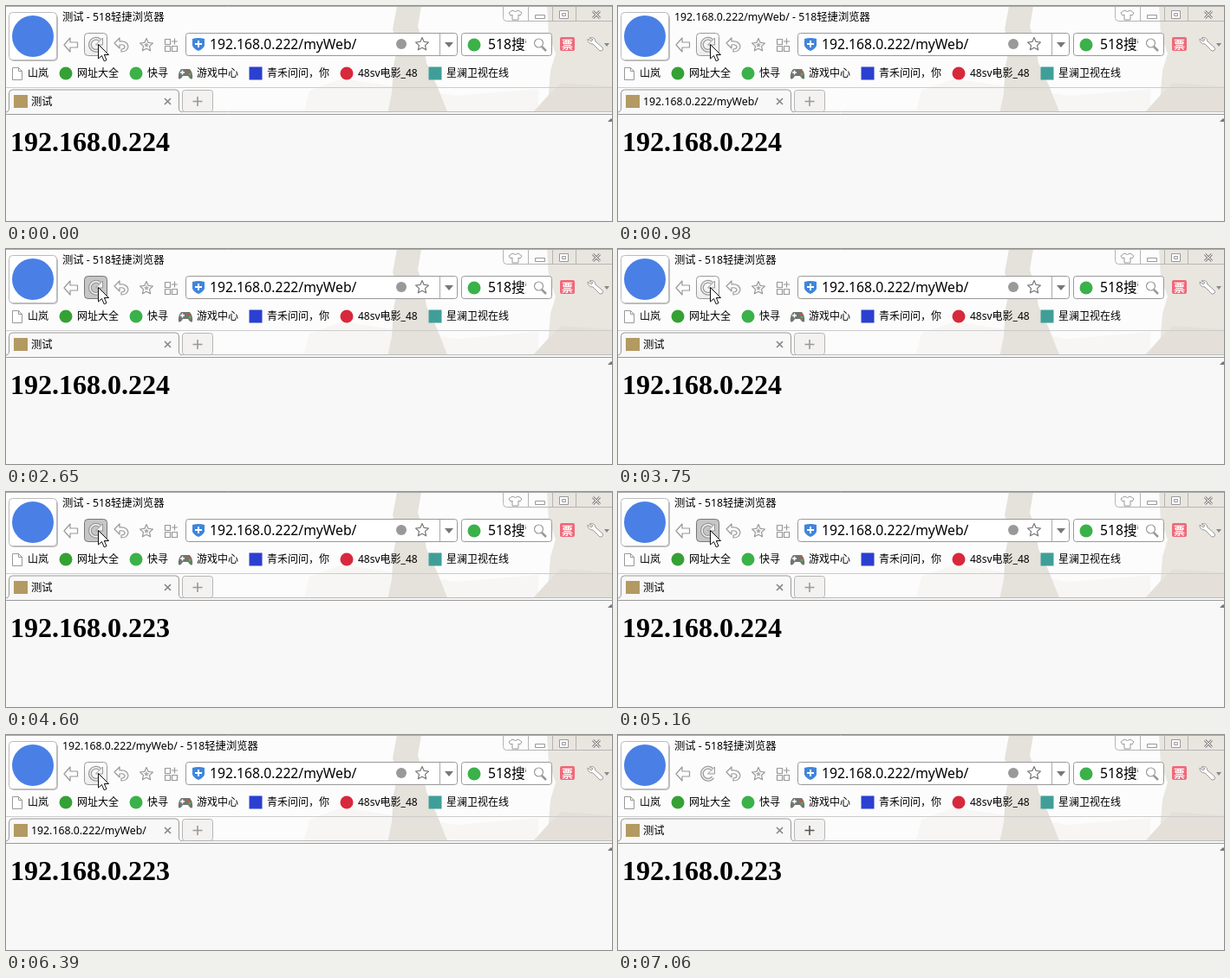
An HTML page that plays this animation: 699 by 249 pixels, repeating every 7310 ms.

```html
<!DOCTYPE html>
<html lang="zh">
<head>
<meta charset="utf-8">
<style>
html, body { margin: 0; width: 100%; height: 100%; overflow: hidden; background: #f8f8f8; }
svg { display: block; width: 699px; height: 249px; }
text { font: 12px "Noto Sans", "Noto Sans CJK SC", "Noto Sans CJK", sans-serif; fill: #000; }
.label { font-size: 12.3px; }
.field { font-size: 15.7px; }
.line { fill: none; stroke: #999; stroke-width: 1.2; stroke-linejoin: round; }
.box { fill: #fff; stroke: #999; }
#address { font: bold 32px "Liberation Serif", serif; }
</style>
</head>
<body>
<svg viewBox="0 0 699 249">
  <defs>
    <linearGradient id="shine" x2="0" y2="1"><stop stop-color="#fff"/><stop offset="1" stop-color="#ececec"/></linearGradient>
    <clipPath id="searchClip"><path d="M550 32h50v26h-50z"/></clipPath>
    <path id="star" d="M0-7.5 2.2-2.6 7.4-2 3.5 1.6 4.6 6.8 0 4.2-4.6 6.8-3.5 1.6-7.4-2-2.2-2.6z"/>
  </defs>

  <!-- window background -->
  <path fill="#fcfcfc" d="M0 0h699v125H0z"/>
  <path fill="#f7f6f4" d="M343 125 350 98 388 84 440 92 520 104 614 96V125z"/>
  <path fill="#e5e1db" d="M451 0h28l-4 24 6 18 4 24 12 26 13 33h-70l5-24 2-32 5-24-6-18z"/>
  <path fill="#e9e6e0" d="M624 0h75v125h-75l4-50 6-20-8-22z"/>
  <path fill="#e4e0d9" d="m606 125 20-22 14-14 59 4v32z"/>
  <path stroke="#aaa" d="M0 .5h699"/>
  <path stroke="#ccc" d="M0 94.500h699"/>

  <!-- window buttons -->
  <path d="M573.5 0v13.500q0 4 4 4H699M602.5 0v17M630.5 0v17M657.5 0v17" fill="none" stroke="#b5b5b5"/>
  <path class="box" d="M584 5q3.500 3 7 0l4 3-2 3-2-1v6h-7v-6l-2 1-2-3z"/>
  <path class="box" d="M610.500 10.500h11v4h-11zM638.500 5.500h10v9h-10zM641.500 8.500h4v3h-4z"/>
  <path d="m677 6 8 8m0-8-8 8" stroke="#888" stroke-width="3"/>
  <path d="m677 6 8 8m0-8-8 8" stroke="#fff"/>

  <!-- badge and title -->
  <rect x="4" y="9" width="56" height="55" rx="5" fill="#000" opacity=".25"/>
  <rect x="3.500" y="7.500" width="55" height="55" rx="4" fill="#fff" stroke="#bbb"/>
  <circle cx="31" cy="35" r="24" fill="#4a80e6"/>
  <text id="title" class="label" x="65" y="17"/>

  <!-- toolbar -->
  <path class="line" d="m74 37-7 8 7 8v-5h8.500v-6H74z"/>
  <rect id="reload" x="90.500" y="31.500" width="26" height="26" rx="4"/>
  <g fill="none" stroke-linejoin="round">
    <path d="M109.500 49a7 7 0 1 1-1-9.500" stroke="#999" stroke-width="4"/>
    <path d="M109.500 49a7 7 0 1 1-1-9.500" stroke="#f4f4f4" stroke-width="1.500"/>
    <path d="M111.500 37v8h-8z" fill="#f4f4f4" stroke="#999"/>
  </g>
  <path class="line" d="m125 43 6-6v4q9-1 10 6-1 6-8 6v-3q4 0 4-3-1-3-6-2v4z"/>
  <use href="#star" class="line" x="162" y="45"/>
  <use href="#star" fill="#aaa" transform="translate(162 45) scale(.4)"/>
  <path class="line" d="M183.500 38.500h6v6h-6zM183.500 46.500h6v6h-6zM191.500 46.500h6v6h-6zM194.500 37.500v7M191 41h7"/>
  <rect class="box" x="207.500" y="31.500" width="313" height="26" rx="3"/>
  <path fill="#3f86dc" d="M215 38q7-2 14 0v8q-2 4-7 6-5-2-7-6z"/>
  <path stroke="#fff" stroke-width="2" d="M222 40v8m-4-4h8"/>
  <text class="field" x="235" y="50">192.168.0.222/myWeb/</text>
  <circle cx="456" cy="44" r="6" fill="#999"/>
  <use href="#star" class="line" x="480" y="44" style="stroke:#777"/>
  <path d="M500.500 32v25" stroke="#aaa"/>
  <path d="M506 42h10l-5 6z" fill="#777"/>
  <rect class="box" x="525.500" y="31.500" width="104" height="26" rx="3"/>
  <circle cx="540" cy="45" r="7.500" fill="#3bb14a"/>
  <text class="field" x="556" y="50" clip-path="url(#searchClip)">518搜索</text>
  <g class="line"><circle cx="614.500" cy="43" r="5"/><path d="m618 47 5 5" stroke-width="2.500"/></g>
  <rect x="639" y="36" width="17" height="16" rx="2" fill="#ee6a7a"/>
  <text x="641" y="49" style="fill:#fff;font-weight:bold;font-size:13px">票</text>
  <path class="box" d="M673 37q6-2 7 4l8 7q2 4-3 4l-8-8q-6 0-6-6l4 3 2-2z"/>
  <path d="M690 43h6l-3 4z" fill="#888"/>

  <g id="bookmarks">
    <path class="box" d="M7.500 71.500h7l4 4v10h-11zM14.500 71.500v4h4"/>
    <path d="M202 73h10q4 5 3 11-2 2-5-3h-6q-3 5-5 3-1-6 3-11z" fill="#6f7770"/>
    <path d="M201 77h5m-2.500-2.500v5" stroke="#fff" stroke-width="1.500"/>
    <circle cx="210" cy="76" r="1.300" fill="#e04a3a"/><circle cx="212" cy="79" r="1.300" fill="#52b848"/>
  </g>

  <!-- tabs and page -->
  <path fill="#f8f8f8" d="M0 123h699v126H0z"/>
  <path d="M0 122.500h699" stroke="#bbb"/>
  <path d="M.5 123q3-1 3-4v-18q0-4 4-4h188q4 0 4 4v18q0 3 3 4" fill="#f8f8f8" stroke="#999"/>
  <path d="M0 125.500h699" stroke="#999"/>
  <rect x="9" y="103" width="16" height="15" fill="#b39a62"/>
  <text id="tab" class="label" x="29" y="115"/>
  <path d="m183 107 7 7m0-7-7 7" stroke="#888" stroke-width="1.700"/>
  <rect x="203.500" y="97.500" width="35" height="25" rx="3" fill="#f3f2f0" stroke="#b5b5b5"/>
  <path id="plus" d="M221 105v11m-5.500-5.500h11" stroke-width="1.600"/>
  <path d="m694 134 4-4 1 1v3z" fill="#777"/>
  <text id="address" x="5" y="168"/>

  <path id="cursor" d="M0 0v16.500l4-3.500 2.700 6.300 2.800-1.200L6.800 12H12z" fill="#fff" stroke="#111"/>
</svg>
<script>
const LOOP = 7310, LEAVE = 6520, GONE = 6660, HOVER_TAB = 7060;
// Each reload: button pressed, address shown as title, page title back
const reloads = [
  [270, 400, 550], [830, 980, 1130], [1400, 1530, 1800], [2080, 2210, 2340],
  [2650, 2800, 2950], [3360, 3490, 3750], [4000, 4150, 4300], [4600, 4730, 4880],
  [5160, 5300, 5430], [5700, 5830, 6110], [6250, 6380, LEAVE]
];
const $ = id => document.getElementById(id);
const set = (id, attrs) => { for (const k in attrs) $(id).setAttribute(k, attrs[k]); };

const bookmarks = [
  [25, '山岚'], [82, '网址大全', 69, '#35a135'], [163, '快寻', 150, '#3bb14a'], [220, '游戏中心'],
  [301, '青禾问问，你', 288, '#2b3fd0', 1], [406, '48sv电影_48', 393, '#d8283c'],
  [508, '星澜卫视在线', 495, '#3f9f98', 1]
];
$('bookmarks').innerHTML += bookmarks.map(([x, name, iconX, color, square]) =>
  (color ? `<rect x="${iconX - 7.5}" y="70.5" width="15" height="15" rx="${square ? 0 : 7.5}" fill="${color}"/>` : '') +
  `<text x="${x}" y="82">${name}</text>`).join('');

function draw(t) {
  const loading = reloads.some(([, load, done]) => t >= load && t < done);
  const pressed = reloads.some(([press, load]) => t >= press && t < load);
  const loads = reloads.filter(r => t >= r[1]).length;
  const name = loading ? '192.168.0.222/myWeb/' : '测试';
  const left = t >= LEAVE;

  $('title').textContent = name + ' - 518轻捷浏览器';
  $('tab').textContent = name;
  $('address').textContent = '192.168.0.' + (224 - loads % 2);
  set('reload', {
    fill: left ? 'none' : pressed ? '#c6c6c6' : 'url(#shine)',
    stroke: left ? 'none' : pressed ? '#777' : '#999'
  });
  set('plus', { stroke: t < HOVER_TAB ? '#999' : '#555' });
  set('cursor', {
    transform: left ? 'translate(335 212)' : 'translate(106.500 44.500)',
    visibility: t < GONE ? 'visible' : 'hidden'
  });
}

const start = performance.now();
(function tick() {
  draw((performance.now() - start) % LOOP);
  requestAnimationFrame(tick);
})();
</script>
</body>
</html>
```
